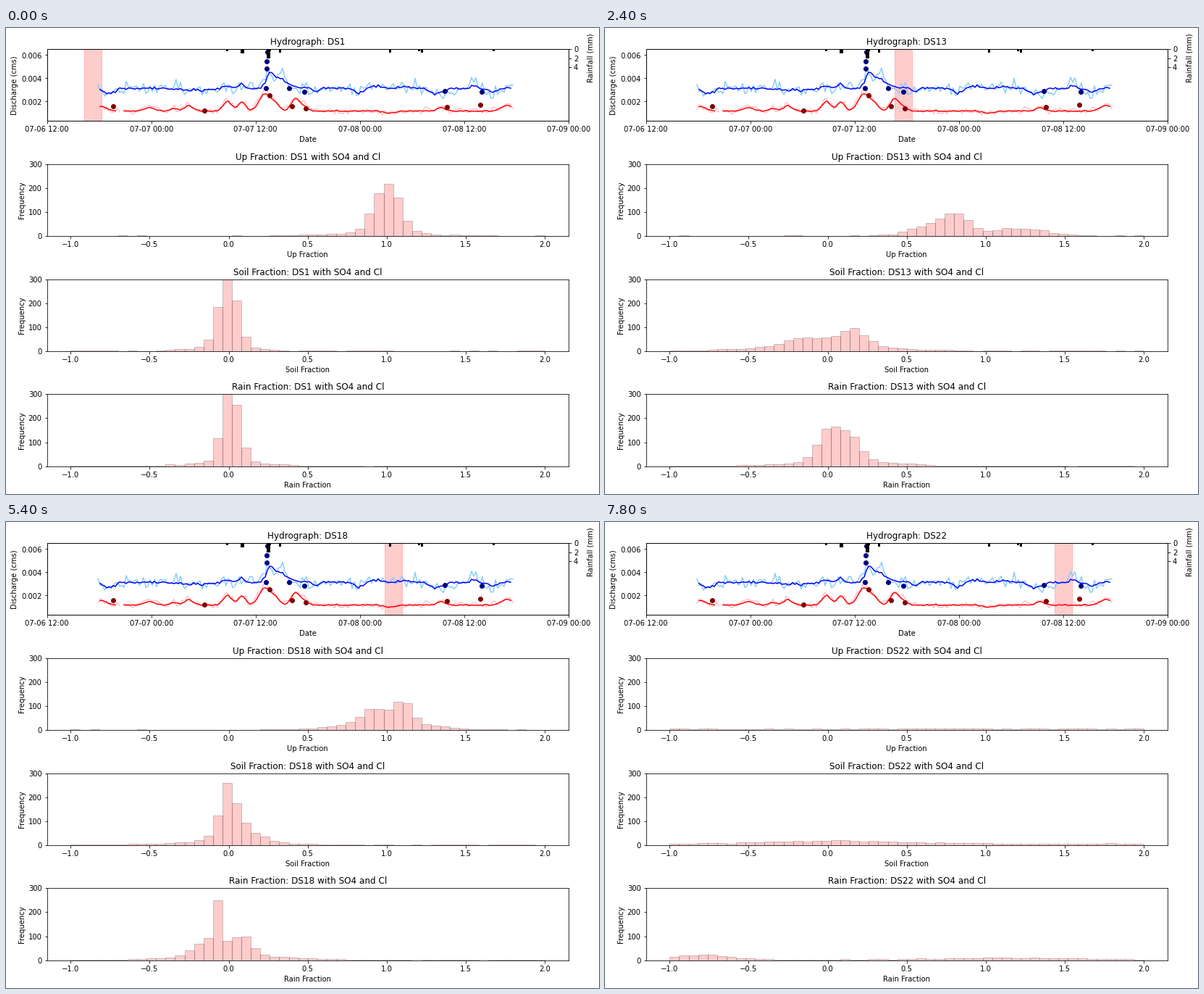
Recreate the animation shown at these times as a matplotlib script. Size 819x643 px, loop 8 s.

```python
import numpy as np
import matplotlib.pyplot as plt
from matplotlib.animation import FuncAnimation

W, H, DPI = 819, 643, 72
LEFT, WIDTH, HEIGHT = 56.6, 720.35, 99.25
TOP, PITCH = 29.1, 158.75
BINS = 50
STEP_FRAMES = 3  # frames of 200 ms per time step

rng = np.random.default_rng(7)
edges = np.linspace(-1, 2, BINS + 1)
centres = (edges[:-1] + edges[1:]) / 2


def hours(x):
    """Stage column to hours since 07-06 12:00."""
    return (np.asarray(x, float) - LEFT) * 60 / WIDTH


def flow(y):
    """Stage row to discharge."""
    return 0.002 + (101.5 - np.asarray(y, float)) / 16000


def bumps(x, peaks):
    """Sum of bell curves given as (centre, height, width)."""
    return sum(h * np.exp(-((x - c) / w) ** 2 / 2) for c, h, w in peaks)


# ---- histograms -------------------------------------------------------

def sample(*peaks):
    """Counts per bin with sampling scatter and a thin ragged floor."""
    mean = bumps(centres, peaks)
    scatter = 0.4 * np.sqrt(mean) * rng.normal(size=BINS)
    return np.clip(mean + scatter, 0, None) + rng.uniform(0, 2.5, BINS)


# Up, soil and rain fractions; DS1 comes just before DS10, so it is step 9.
SHAPES = {
    9: (sample((1.0, 210, 0.08), (0.95, 12, 0.3)),
        sample((-0.006, 315, 0.057), (-0.02, 22, 0.17)),
        sample((0.01, 310, 0.055), (0, 18, 0.22))),
    11: (sample((0.7, 24, 0.33), (1.75, 16, 0.2), (-0.2, 6, 0.4)),
         sample((0.37, 38, 0.14), (0.8, 18, 0.2), (0, 10, 0.9)),
         sample((-0.15, 35, 0.09), (-0.2, 36, 0.33), (0.3, 9, 0.6))),
    13: (sample((0.82, 68, 0.08), (0.67, 42, 0.15), (1.22, 32, 0.16)),
         sample((0.17, 72, 0.08), (-0.13, 36, 0.13), (0, 20, 0.4)),
         sample((0.01, 130, 0.075), (0.15, 92, 0.07), (0.1, 17, 0.35))),
    16: (sample((0.85, 80, 0.11), (1.24, 40, 0.13), (1, 13, 0.45)),
         sample((0.13, 110, 0.055), (0.22, 54, 0.09), (-0.2, 32, 0.2)),
         sample((-0.01, 145, 0.045), (-0.03, 75, 0.12), (-0.15, 14, 0.35))),
    18: (sample((0.91, 60, 0.06), (1.09, 92, 0.06), (1.0, 36, 0.25)),
         sample((-0.005, 185, 0.045), (0.05, 80, 0.12), (0, 8, 0.4)),
         sample((-0.07, 170, 0.025), (-0.13, 74, 0.08), (0.08, 90, 0.07),
                (0.05, 15, 0.35))),
    20: (sample((0.5, 4, 3)),
         sample((-0.35, 10, 0.2), (0.5, 7, 2)),
         sample((-0.75, 18, 0.22), (1.1, 7, 0.6))),
    22: (sample((0.5, 4, 3)),
         sample((0.05, 12, 0.4), (0.5, 5, 2)),
         sample((-0.8, 20, 0.2), (1.1, 8, 0.5))),
}
KEYS = sorted(SHAPES)


def counts_at(step, row):
    """Counts of one panel, blended between the described steps."""
    j = int(np.clip(np.searchsorted(KEYS, step), 1, len(KEYS) - 1))
    a, b = KEYS[j - 1], KEYS[j]
    t = (step - a) / (b - a)
    return SHAPES[a][row] * (1 - t) + SHAPES[b][row] * t


def window_start(step):
    """Left edge, in hours, of the two-hour sampling window."""
    if step == 9:
        return 4.25
    return np.interp(step, [10, 13, 16, 20, 22], [22.6, 28.6, 34.83, 42.83, 47])


# ---- discharge curves, in stage rows every quarter hour ---------------

x = np.arange(127, 702, 3)


def series(base, peaks, wiggle, noise):
    """Smoothed and raw versions of one discharge record."""
    swell = bumps(x, peaks)
    smooth = base + swell + rng.normal(0, wiggle, len(x))
    scatter = np.clip(rng.normal(0, noise, len(x)), -2.5 * noise, 1.7 * noise)
    smooth[[0, -1]] = np.nan
    return smooth, base + 1.15 * swell + scatter


blue, blue_raw = series(83, [
    (143, 7, 8), (260, 3, 20), (304, -4, 4), (325, -6, 4), (364, -14, 4),
    (376, -14, 11), (430, 5, 4), (487, 6, 8), (510, -3, 8), (549, -4, 4),
    (594, 8, 9), (646, -4, 4), (670, 4, 9)], 0.9, 5.5)
red, red_raw = series(114.5, [
    (133, -6, 6), (198, -5, 7), (232, -4, 4), (252, -7, 6), (306, -13, 6),
    (326, -12, 5), (358, -24, 8), (373, -8, 5), (400, -17, 6), (413, -5, 5),
    (530, 3, 8), (601, -5, 5), (692, -8, 8)], 0.4, 2.4)
red[(x > 153) & (x < 162)] = np.nan
red_raw[(x > 157) & (x < 162)] = np.nan

# ---- figure -----------------------------------------------------------

fig = plt.figure(figsize=(W / DPI, (H + 1e-6) / DPI), dpi=DPI, facecolor="white")


def panel(row):
    bottom = H - (TOP + PITCH * row + HEIGHT)
    return fig.add_axes([LEFT / W, bottom / H, WIDTH / W, HEIGHT / H])


ax = panel(0)
span = ax.axvspan(0, 2, color="red", alpha=0.2)
for rows, color in ((blue_raw, "lightskyblue"), (blue, "blue"),
                    (red_raw, "pink"), (red, "red")):
    ax.plot(hours(x), flow(rows), color=color, lw=1.5)
for color, xs, ys in (
        ("navy", [359, 360, 360, 361, 391, 412, 606, 657],
         [83, 56, 46, 33, 83, 88, 87, 88]),
        ("maroon", [148, 273, 363, 395, 414, 609, 655],
         [108, 114, 93, 108, 111, 109, 106])):
    ax.plot(hours(np.add(xs, 0.5)), flow(np.add(ys, 0.5)), "o", color=color, ms=6)
days = [f"07-{6 + h // 24:02d} {h % 24:02d}:00" for h in range(12, 73, 12)]
ax.set_xlim(0, 60)
ax.set_ylim(flow(TOP + HEIGHT), flow(TOP))
ax.set_xticks(range(0, 61, 12), days)
ax.set_yticks([0.002, 0.004, 0.006])
ax.set_xlabel("Date")
ax.set_ylabel("Discharge (cms)")
title = ax.set_title("")

rain = ax.twinx()
for px, width, depth in ((305.5, 3, 0.5), (326.5, 5, 1), (361.5, 3, 1.2),
                         (362.5, 4, 2.1), (365, 2, 0.5), (378.5, 3, 0.8),
                         (530.5, 3, 0.8), (570.5, 3, 0.4), (574.5, 3, 0.8),
                         (673.5, 3, 0.5)):
    rain.bar(hours(px), depth, width / 12, color="black")
rain.set_xlim(0, 60)
rain.set_ylim(16, 0)
rain.set_yticks([0, 2, 4])
fig.text(807 / W, 1 - 41 / H, "Rainfall (mm)", rotation=90,
         ha="center", va="center")

panels = []
for row, name in enumerate(("Up Fraction", "Soil Fraction", "Rain Fraction")):
    h = panel(row + 1)
    bars = h.bar(edges[:-1], np.zeros(BINS), 3 / BINS, align="edge",
                 color="red", edgecolor="black", linewidth=1, alpha=0.2)
    h.set_xlim(-1.15, 2.15)
    h.set_ylim(0, 300)
    h.set_xticks(np.arange(-1, 2.1, 0.5))
    h.set_yticks([0, 100, 200, 300])
    h.set_xlabel(name)
    h.set_ylabel("Frequency")
    panels.append((name, h.set_title(""), bars))


def draw(frame):
    step = 9 + frame // STEP_FRAMES
    site = "DS1" if step == 9 else f"DS{step}"
    title.set_text(f"Hydrograph: {site}")
    span.set_x(window_start(step))
    for row, (name, heading, bars) in enumerate(panels):
        heading.set_text(f"{name}: {site} with SO4 and Cl")
        for bar, count in zip(bars, counts_at(step, row)):
            bar.set_height(count)
    return []


anim = FuncAnimation(fig, draw, frames=40, interval=200, repeat=True,
                     repeat_delay=0, blit=False)
plt.show()
```
